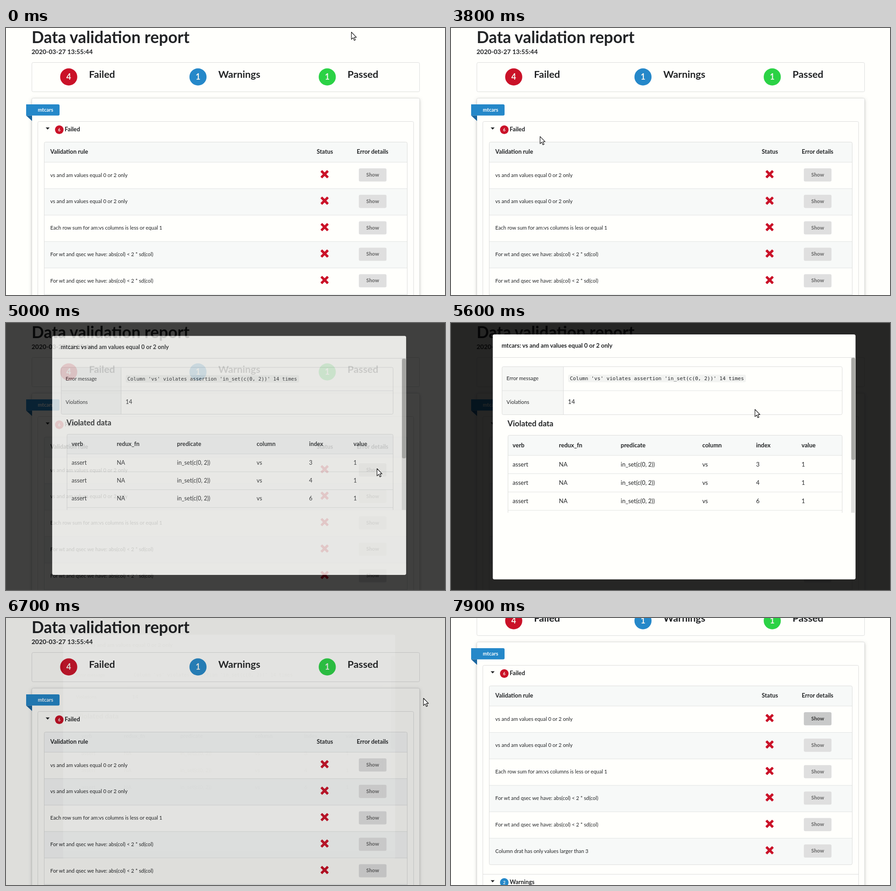
An HTML page that plays this animation: 959x584 px, repeating every 8000 ms.

```html
<!DOCTYPE html>
<html lang="en">
<head>
<meta charset="utf-8">
<title>Data validation report</title>
<style>
  html, body { margin: 0; width: 100%; height: 100%; overflow: hidden; background: #fffffc; }
  svg { display: block; width: 959px; height: 584px; font-family: Lato, sans-serif; fill: #222426; }
  text { white-space: pre; }
  .b { font-weight: 700; }
  .card { filter: drop-shadow(0 2px 2px rgba(34,36,38,.12)) drop-shadow(0 2px 4px rgba(34,36,38,.13)); }
</style>
</head>
<body>
<svg id="stage" viewBox="0 0 959 584" xmlns="http://www.w3.org/2000/svg"></svg>
<script>
const LOOP = 8000, STEP = 100;
const PAPER = '#fffffc', TINT = '#f7f9f8', LINE = '#dcdddc', RED = '#ca1228', BLUE = '#2588c9', GREEN = '#2bd245';

const text = (x, y, size, str, attrs = '') =>
  `<text x="${x}" y="${y}" font-size="${size}" ${attrs}>${str.replace(/</g, '&lt;')}</text>`;
const bold = (x, y, size, str, attrs = '') => text(x, y, size, str, 'class="b" ' + attrs);
const box = (x1, y1, x2, y2, fill, attrs = '') =>
  `<rect x="${x1}" y="${y1}" width="${x2 - x1}" height="${y2 - y1}" fill="${fill}" ${attrs}/>`;
const frame = (x1, y1, x2, y2, fill = 'none') => box(x1, y1, x2, y2, fill, `rx="3" stroke="${LINE}"`);
const hline = (x1, x2, y, color = '#e1e3e2') => `<path d="M${x1} ${y}H${x2}" stroke="${color}"/>`;
const badge = (x, y, r, size, n, color) =>
  `<circle cx="${x}" cy="${y}" r="${r}" fill="${color}"/>` +
  bold(x, y + size * 0.36, size, n, 'text-anchor="middle" fill="#f5f5f0"');

function summary() {
  const items = [['4', 'Failed', RED], ['1', 'Warnings', BLUE], ['1', 'Passed', GREEN]];
  return frame(56.5, 75.5, 903.5, 139.5) + items.map(([n, label, color], i) => {
    const x = 137 + i * 282.4;
    return badge(x, 107, 18.7, 18, n, color) + bold(x + 44.3, 109, 21.8, label);
  }).join('');
}

function section(y, n, label, color) {
  return `<path d="M86.7 ${y + 13.5}h8.6l-4.3 4.8z"/>` +
    badge(116.4, y + 18.5, 9.4, 9, n, color) + bold(128.3, y + 22, 12.8, label);
}

function rules() {
  const range = 'vs and am values equal 0 or 2 only';
  const spread = 'For wt and qsec we have: abs(col) < 2 * sd(col)';
  const names = [range, range, 'Each row sum for am:vs columns is less or equal 1',
    spread, spread, 'Column drat has only values larger than 3'];
  const top = 293.5, pitch = 57.85;
  const bar = angle => `<rect x="-10.3" y="-2.7" width="20.6" height="5.4" rx="1" transform="rotate(${angle})"/>`;
  const rows = names.map((name, i) => {
    const y = top + i * pitch;
    return (i % 2 ? box(84, y, 876, y + pitch, TINT) : '') + hline(84, 876, y) +
      text(96.8, y + 32, 11.27, name) +
      `<g transform="translate(696 ${y + 26.3})" fill="${RED}">${bar(45)}${bar(-45)}</g>` +
      `<g ${i ? '' : 'id="show"'} fill="#666">` +
      box(770.8, y + 13.5, 831.2, y + 42.3, '#dfdfdf', 'rx="3.3"') +
      bold(801, y + 31.3, 11.3, 'Show', 'text-anchor="middle"') + '</g>';
  }).join('');
  return box(84, 250, 876, top, TINT) +
    bold(96.8, 275, 12.8, 'Validation rule') + bold(678.8, 275, 12.8, 'Status') +
    bold(766.3, 275, 12.8, 'Error details') + rows + frame(83.5, 249.5, 876.5, top + 6 * pitch);
}

function page() {
  return bold(56, 33, 35.4, 'Data validation report') + bold(55.8, 57, 13.9, '2020-03-27 13:55:44') + summary() +
    `<g class="card">${frame(56.5, 153.5, 903.5, 900, PAPER)}</g>` +
    `<path d="M44 167h70q3 0 3 3v18.5q0 3-3 3H44z" fill="${BLUE}"/>` +
    '<path d="M44 191.5h13v12z" fill="#1b67a0"/>' +
    bold(69.5, 183, 11.2, 'mtcars', 'fill="#fff"') +
    frame(69.5, 204.5, 890.5, 900) + section(204, '6', 'Failed', RED) + rules() +
    hline(70, 890, 661.5, LINE) + section(661, '2', 'Warnings', BLUE);
}

function modal() {
  const columns = [['verb', 'assert', 134.6], ['redux_fn', 'NA', 235.8], ['predicate', 'in_set(c(0, 2))', 370.8],
    ['column', 'vs', 549], ['index', '346', 666.4], ['value', '1', 765.7]];
  const rowTop = r => 289.5 + r * 40.1;
  const cells = columns.map(([head, value, x]) => bold(x, 271.5, 13, head) +
    [0, 1, 2].map(r => text(x, rowTop(r) + 24, 13, head === 'index' ? value[r] : value)).join('')).join('');
  const table = box(125, 246, 854, 289.5, TINT) + frame(124.5, 245.5, 854.5, 450) +
    [0, 1, 2, 3].map(r => hline(125, 854, rowTop(r))).join('') + cells;
  return box(91.3, 25, 883.7, 560.7, PAPER, 'rx="3.5"') +
    bold(110.5, 54, 13.05, 'mtcars: vs and am values equal 0 or 2 only') + hline(91.3, 883.7, 75.5, LINE) +
    box(874, 76, 883.7, 415, '#e2e2e0') + box(874.5, 76, 883.3, 299.5, '#a9a9a6', 'rx="4"') +
    box(112, 96, 245, 200, '#f6f7f5') + frame(111.5, 95.5, 854.5, 200.5) +
    hline(112, 854, 148) + `<path d="M245.5 96V200" stroke="${LINE}"/>` +
    text(121.3, 125, 11.3, 'Error message') + text(121.3, 177.3, 11.3, 'Violations') +
    box(256, 113, 644, 129.5, '#f2f3f1', 'rx="3"') +
    text(259.7, 125, 11.08, "Column 'vs' violates assertion 'in_set(c(0, 2))' 14 times",
      'font-family="DejaVu Sans Mono, monospace"') +
    text(255.6, 177.3, 13, '14') + bold(123.5, 225.5, 16.9, 'Violated data') +
    `<g clip-path="url(#body)">${table}</g>`;
}

const stage = document.getElementById('stage');
stage.innerHTML =
  '<clipPath id="body"><rect x="91" y="76" width="783" height="339"/></clipPath>' +
  box(0, 0, 959, 584, PAPER) + `<g id="page">${page()}</g>` +
  `<g id="dimmer">${box(0, 0, 959, 584, '#000', 'opacity=".85"')}<g id="modal">${modal()}</g></g>` +
  '<path id="cursor" d="M.5 .5V16.3L4.2 12.8 6.7 18.6 9.3 17.5 6.8 11.8H11.5Z" fill="#fff" stroke="#111" stroke-width="1.15" stroke-linejoin="round"/>';
const [pageEl, dimmerEl, modalEl, cursorEl, showEl] =
  ['page', 'dimmer', 'modal', 'cursor', 'show'].map(id => document.getElementById(id));

const progress = (t, start, length) => Math.min(1, Math.max(0, (t - start) / length));
const smooth = u => u * u * (3 - 2 * u);
const easeOut = u => 1 - (1 - u) ** 2.2;

// Pointer glides: start time, end time and the place it comes to rest.
const glides = [
  [100, 400, 824, 100], [800, 1100, 567, 70], [1100, 1300, 843, 52], [1400, 1600, 940, 48],
  [2400, 3000, 134, 229], [3710, 4200, 810, 318], [5000, 5200, 436, 246],
  [5500, 5600, 663.5, 188.5], [5800, 6100, 911.5, 175], [6800, 7100, 805, 220]
];

function pointerAt(t) {
  let x = 754, y = 8.5;
  for (const [start, end, toX, toY] of glides) {
    const k = smooth(progress(t, start, end - start));
    x += (toX - x) * k;
    y += (toY - y) * k;
  }
  return [x, y];
}

function render(t) {
  const scrolling = t >= 7800, hidden = scrolling || (t >= 5800 && t < 6000);
  cursorEl.setAttribute('transform', `translate(${pointerAt(t)})`);
  cursorEl.style.display = hidden ? 'none' : '';

  const closing = t >= 6250;
  const shown = closing ? 1 - easeOut(progress(t, 6250, 780)) : easeOut(progress(t, 4630, 600));
  const scale = closing ? 0.9 + 0.1 * shown : 0.8 + 0.2 * shown;
  dimmerEl.setAttribute('opacity', shown);
  modalEl.setAttribute('opacity', shown);
  modalEl.setAttribute('transform', `translate(487.5 159) scale(${scale}) translate(-487.5 -159)`);

  const active = scrolling || (t >= 4200 && !closing);
  showEl.setAttribute('fill', active ? '#333' : '#666');
  showEl.firstChild.setAttribute('fill', active ? '#c8c9c9' : '#dfdfdf');

  pageEl.setAttribute('transform', `translate(0 ${-101 * smooth(progress(t, 7700, 200))})`);
}

const start = performance.now();
function tick() {
  const t = (performance.now() - start) % LOOP;
  render(Math.floor(t / STEP) * STEP);
  requestAnimationFrame(tick);
}
tick();
</script>
</body>
</html>
```
